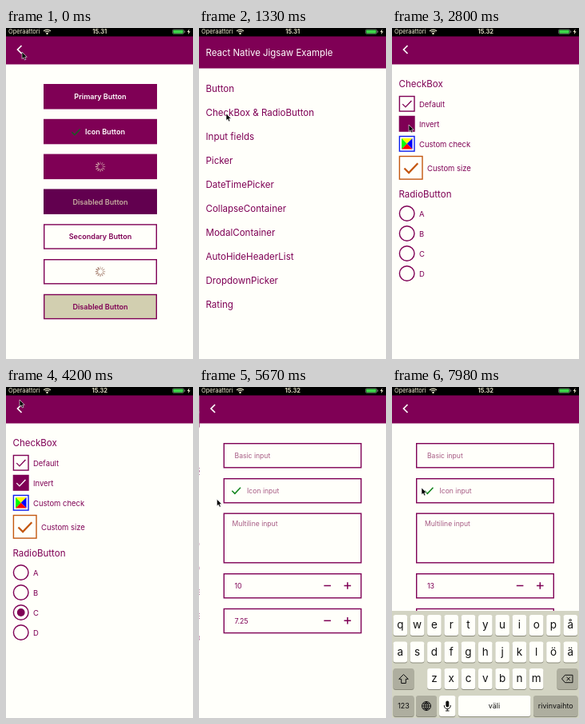
An HTML page that plays this animation: 234 px wide and 414 px high, repeating every 8000 ms.

```html
<!DOCTYPE html>
<html lang="en">
<head>
<meta charset="utf-8">
<title>Component library demo</title>
<style>
  html, body { margin: 0; width: 100%; height: 100%; overflow: hidden; background: #000; }
  svg { display: block; width: 234px; height: 414px; font-family: Inter, "Open Sans", sans-serif; }
</style>
</head>
<body>
<svg id="stage" viewBox="0 0 234 414"></svg>
<script>
const W = 234, LOOP = 8000, STEP = 70;
const PLUM = '#7f0055', PAPER = '#fffffa', CREAM = '#f1eed2', GREEN = '#11851c', ORANGE = '#c4570f', BLUE = '#0a1cf0';
const stage = document.getElementById('stage');

// Markup helpers
const rect = (x, y, w, h, fill, extra = '') =>
  `<rect x="${x}" y="${y}" width="${w}" height="${h}" fill="${fill}" ${extra}/>`;
const frame = (x, y, w, h, color = PLUM, fill = 'none') =>
  rect(x + .7, y + .7, w - 1.4, h - 1.4, fill, `stroke="${color}" stroke-width="1.4"`);
const line = (d, color, width = 1.5, extra = '') =>
  `<path d="${d}" fill="none" stroke="${color}" stroke-width="${width}" ${extra}/>`;
const text = (str, x, mid, size, color = PLUM, extra = '') =>
  `<text x="${x}" y="${mid + size * .36}" font-size="${size}" fill="${color}" ${extra}>${str}</text>`;
const centered = (str, x, mid, size, color, weight = 400) =>
  text(str, x, mid, size, color, `text-anchor="middle" font-weight="${weight}"`);
const tick = (x, y, s, color, width = 1.5, extra = '') =>
  line(`M${x - 5 * s} ${y + .3 * s}l${3.4 * s} ${3.4 * s}l${6.8 * s} ${-7.2 * s}`, color, width, extra);
const page = (id, headerBottom, body) =>
  `<g id="${id}">${rect(0, 10, W, 404, PAPER)}${rect(0, 10, W, headerBottom - 10, PLUM)}${body}</g>`;
const detail = (id, body) =>
  page(id, 45.5, line('M19.5 22L14.5 27L19.5 32', '#fff', 1.7) + body);

function spinner(id, y, color) {
  let spokes = '';
  for (let i = 0; i < 12; i++)
    spokes += line('M0 -3.3V-5.8', color, 1.1,
      `stroke-linecap="round" opacity="${.45 + .55 * i / 11}" transform="rotate(${i * 30})"`);
  return `<g transform="translate(118 ${y})"><g id="${id}">${spokes}</g></g>`;
}

function listPage() {
  const rows = ['Button', 'CheckBox &amp; RadioButton', 'Input fields', 'Picker', 'DateTimePicker',
    'CollapseContainer', 'ModalContainer', 'AutoHideHeaderList', 'DropdownPicker', 'Rating'];
  return page('list', 50.5, text('React Native Jigsaw Example', 8.5, 31, 11.45, '#fff') +
    rows.map((r, i) => text(r, 8.5, 75.5 + 30 * i, 11.55)).join(''));
}

function buttonPage() {
  const top = i => 70 + 43.8 * i;
  const solid = (i, fill) => rect(47, top(i), 142, 31.5, fill);
  const label = (str, i, color, x = 118) => centered(str, x, top(i) + 16, 9.05, color, 600);
  return detail('buttons',
    solid(0, PLUM) + label('Primary Button', 0, '#fff') +
    solid(1, PLUM) + tick(87.5, 130, 1, '#145f22') + label('Icon Button', 1, '#fff', 124) +
    solid(2, PLUM) + spinner('spinA', 173.5, '#e6cdbe') +
    solid(3, '#62004f') + label('Disabled Button', 3, '#c5ab9f') +
    frame(47, top(4), 142, 31.5) + label('Secondary Button', 4, PLUM) +
    frame(47, top(5), 142, 31.5) + spinner('spinB', 304.7, '#8c5a48') +
    frame(47, top(6), 142, 31.5, PLUM, '#d2cfb0') + label('Disabled Button', 6, PLUM));
}

function checkPage() {
  const LEFT = 8.7, SIZE = 20, MID = LEFT + SIZE / 2;
  const label = (str, y, x = 34) => text(str, x, y, 9.45);
  const wedge = (edge, color) => `<polygon points="${edge} ${MID},144.8" fill="${color}"/>`;
  const radios = ['A', 'B', 'C', 'D'].map((name, i) => {
    const y = 232 + 25 * i;
    return `<circle cx="${MID}" cy="${y}" r="9.3" fill="none" stroke="${PLUM}" stroke-width="1.4"/>` +
      `<circle id="dot${name}" cx="${MID}" cy="${y}" r="4.9" fill="${PLUM}"/>` + label(name, y + .5);
  }).join('');
  return detail('checks', text('CheckBox', 8.5, 70, 11.5) +
    frame(LEFT, 84.8, SIZE, SIZE) + tick(MID, 94.8, 1.1, PLUM, 1.4) + label('Default', 95.5) +
    rect(LEFT, 109.8, SIZE, SIZE, PLUM) + tick(MID, 119.8, 1.1, '#fff', 1.4, 'id="invert"') + label('Invert', 120.5) +
    frame(LEFT, 134.8, SIZE, SIZE, BLUE) +
    wedge('12,138 25.5,138', '#ff0') + wedge('12,138 12,151.5', '#0f0') +
    wedge('25.5,138 25.5,151.5', '#00f') + wedge('12,151.5 25.5,151.5', '#f00') +
    label('Custom check', 145.5) +
    frame(LEFT, 159.8, 30, 30, ORANGE) + tick(23.7, 175, 1.65, ORANGE, 2.2) + label('Custom size', 175.5, 44) +
    text('RadioButton', 8.5, 208, 11.5) + radios);
}

function inputPage() {
  const field = (y, h = 31.5) => frame(30, y, 173, h);
  const hint = (str, x, y) => text(str, x, y, 8.6, '#a65a83');
  const minus = y => line(`M155.8 ${y}h8.6`, PLUM);
  const plus = (y, id) => line(`M181 ${y}h8.6M185.3 ${y - 4.3}v8.6`, PLUM, 1.5, `id="${id}"`);
  return detail('inputs',
    field(70) + hint('Basic input', 44, 86) +
    field(114) + tick(46, 129.5, 1.05, GREEN) + hint('Icon input', 59.5, 130) +
    field(157.5, 63) + hint('Multiline input', 41, 171) +
    field(233) + text('13', 44, 249, 8.8, PLUM, 'id="count"') + minus(248.5) + plus(248.5, 'plusA') +
    field(276.8) + text('7.25', 44, 293, 8.8) + minus(292.3) + plus(292.3, 'plusB'));
}

function keyboard() {
  const GREY = '#aeae9f', INK = '#111';
  const key = (x, y, w, fill = '#fffffa') =>
    rect(x, y + 1, w, 26, '#8b8b7c', 'rx="3"') + rect(x, y, w, 26, fill, 'rx="3"');
  const row = (letters, x, y) => [...letters].map((c, i) =>
    key(x + 21.3 * i, y, 17.6) + centered(c, x + 8.8 + 21.3 * i, y + 12.5, 13.5, INK)).join('');
  const glyph = d => line(d, INK, 1, 'stroke-linejoin="round"');
  return `<g id="keyboard">${rect(0, 280, W, 134, '#d3d4c3')}` +
    row('qwertyuiopå', 1.5, 285) + row('asdfghjklöä', 1.5, 318.5) + row('zxcvbnm', 44.1, 352) +
    key(1.5, 352, 26, GREY) + glyph('M14.5 359.5L8.7 365.3H11.7V370.5H17.3V365.3H20.3Z') +
    key(206.5, 352, 26, GREY) + glyph('M212.5 365L216.5 360.3H226V369.7H216.5ZM218.5 362.7L223 367.3M223 362.7L218.5 367.3') +
    key(1.5, 386, 26, GREY) + centered('123', 14.5, 399, 9, INK) +
    key(30, 386, 26, GREY) + `<circle cx="43" cy="399" r="5.5" fill="none" stroke="${INK}"/>` +
    glyph('M37.5 399H48.5M43 393.5V404.5M38.7 396H47.3M38.7 402H47.3M43 393.5Q37.5 399 43 404.5Q48.5 399 43 393.5') +
    key(59, 386, 20.5) + rect(67.3, 392.5, 4, 8, INK, 'rx="2"') +
    glyph('M65.3 398Q65.3 402.5 69.3 402.5Q73.3 402.5 73.3 398M69.3 402.5V405M67 405H71.6') +
    key(83, 386, 90.5) + centered('väli', 128, 399, 9, INK) +
    key(177, 386, 55.5, GREY) + centered('rivinvaihto', 204.8, 399, 9, INK) + '</g>';
}

function statusBar() {
  const arc = r => line(`M${51.5 - r * .8} ${7.6 - r * .7}Q51.5 ${7.6 - r * 1.25} ${51.5 + r * .8} ${7.6 - r * .7}`, CREAM, 1.1);
  return rect(0, 0, W, 10.5, '#000') + text('Operaattori', 3, 4.6, 7.4, CREAM) +
    arc(5.6) + arc(3.5) + `<circle cx="51.5" cy="6.9" r="1.2" fill="${CREAM}"/>` +
    text('15.31', 117.3, 4.6, 7.6, CREAM, 'id="clock" text-anchor="middle" font-weight="600"') +
    rect(208.5, 1.8, 14, 5.6, 'none', 'rx="1.3" stroke="#8a8a8a" stroke-width=".6"') +
    rect(209.3, 2.5, 12.4, 4.2, '#3fd64c', 'rx=".8"') + rect(223.3, 3.5, .9, 2.2, '#8a8a8a') +
    `<path d="M229.4 1.3L226.7 5H228.4L227.9 8L230.6 4.2H228.9Z" fill="${CREAM}"/>`;
}

stage.innerHTML = listPage() + buttonPage() + checkPage() + inputPage() + keyboard() + statusBar() +
  `<path id="cursor" d="M0 0V8.6L2 6.9L3.4 10L4.9 9.3L3.6 6.3H6.2Z" fill="#000" stroke="#fff" stroke-width=".6"/>`;
const $ = id => document.getElementById(id);

// Timeline: pages slide in at `enter` and out at `leave`
const SLIDE = 500;
const visits = [
  { id: 'buttons', enter: -2000, leave: 0 },
  { id: 'checks', enter: 1500, leave: 4290 },
  { id: 'inputs', enter: 5300, leave: 9000 }
];
const cursorTrack = [
  [0, 20, 30], [420, 20, 30], [1050, 34, 107], [1820, 34, 107], [2380, 20, 117], [2660, 21, 121],
  [2980, 21, 121], [3260, 20, 299], [3430, 20, 299], [3630, 20, 281], [3780, 20, 281],
  [4150, 17, 16], [4500, 17, 16], [5020, 22, 140], [5650, 22, 140], [6370, 187, 246],
  [6860, 187, 246], [7400, 37, 126], [8000, 37, 126]
];
const taps = [6430, 6570, 6700];

const clamp = v => Math.min(1, Math.max(0, v));
const smooth = p => p * p * (3 - 2 * p);
const easeOut = (p, power) => 1 - (1 - clamp(p)) ** power;
const move = (id, x, y = 0) => $(id).setAttribute('transform', `translate(${x} ${y})`);
const show = (id, on) => $(id).setAttribute('visibility', on ? 'visible' : 'hidden');

function cursorAt(t) {
  const i = cursorTrack.findIndex(k => k[0] > t);
  const [t0, x0, y0] = cursorTrack[i - 1], [t1, x1, y1] = cursorTrack[i];
  const p = smooth((t - t0) / (t1 - t0));
  return [x0 + (x1 - x0) * p, y0 + (y1 - y0) * p];
}

function render(t) {
  let covered = 0;
  for (const { id, enter, leave } of visits) {
    const shown = easeOut((t - enter) / SLIDE, 4.5) - easeOut((t - leave) / SLIDE, 4.5);
    covered = Math.max(covered, shown);
    move(id, W * (1 - shown));
  }
  move('list', -.3 * W * covered);

  const turn = Math.floor(t / 1000 * 12) * 30;
  for (const id of ['spinA', 'spinB']) $(id).setAttribute('transform', `rotate(${turn})`);

  $('clock').textContent = t < 2660 ? '15.31' : '15.32';
  show('invert', t < 2730 || t >= 2940);
  show('dotA', false);
  show('dotB', false);
  show('dotC', t >= 3640);
  show('dotD', t >= 3290 && t < 3640);

  const done = taps.filter(tap => t >= tap);
  $('count').textContent = 10 + done.length;
  const sinceTap = done.length ? t - done[done.length - 1] : Infinity;
  $('plusA').setAttribute('opacity', .35 + .65 * clamp(sinceTap / 180));

  move('keyboard', 0, 134 * (1 - easeOut((t - 7540) / 380, 3)));
  move('cursor', ...cursorAt(t));
}

const start = performance.now();
function play() {
  const t = (performance.now() - start) % LOOP;
  render(Math.floor(t / STEP) * STEP);
  requestAnimationFrame(play);
}
play();
</script>
</body>
</html>
```
